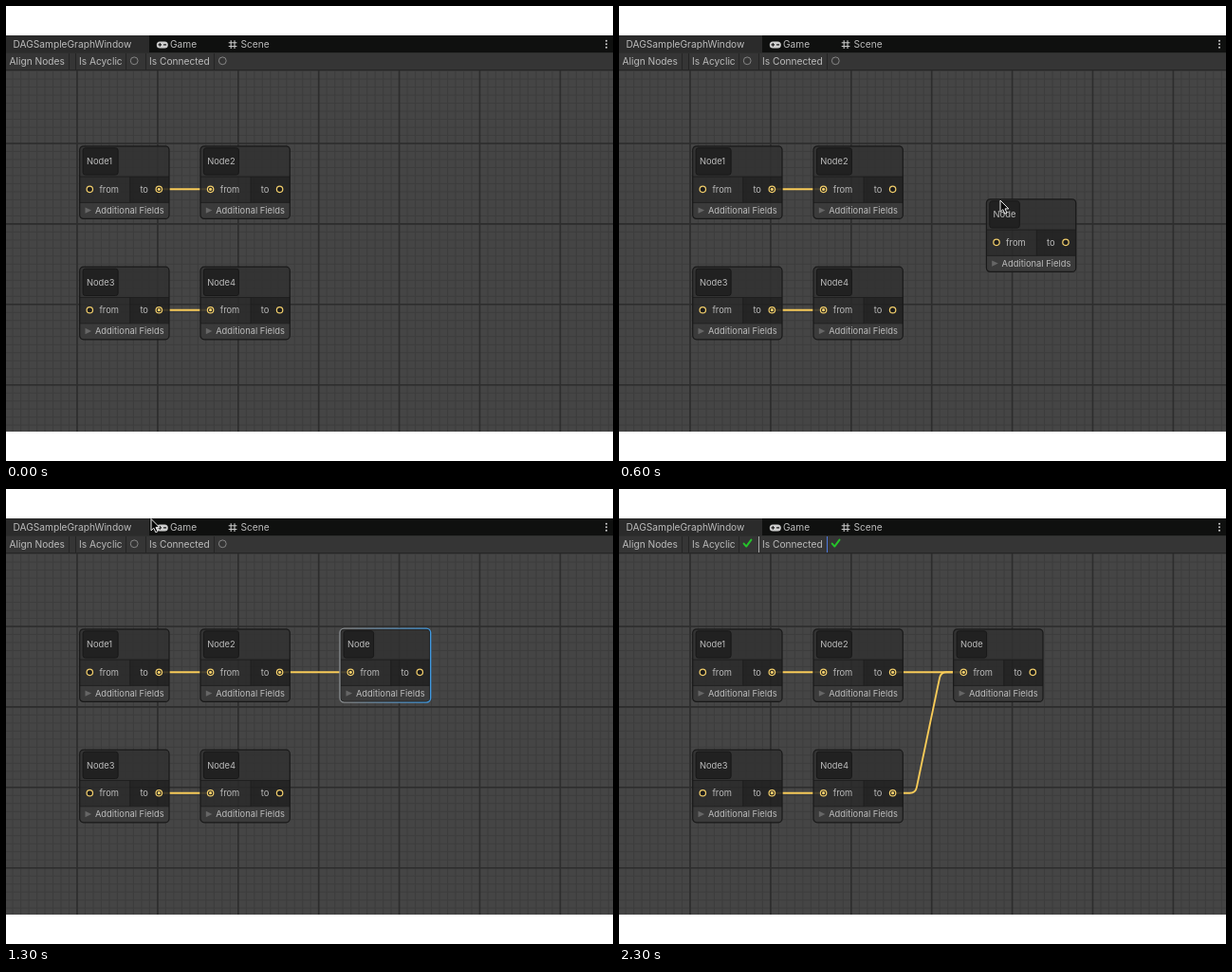
An HTML page that plays this animation: 640 px wide and 480 px high, repeating every 2400 ms.

```html
<!DOCTYPE html>
<html lang="en">
<head>
<meta charset="utf-8">
<title>Graph window</title>
<style>
  html, body { margin: 0; width: 100%; height: 100%; overflow: hidden; background: #fff; }
  svg { display: block; width: 640px; height: 480px; }
  text { font: 9.34px Inter, "Open Sans", sans-serif; fill: #bcbcbc; white-space: pre; }
  .bar text { font-size: 10.19px; }
  .menu text { font-size: 9.1px; font-weight: 500; fill: #747072; }
  .menu .on { fill: #fff; }
  .edge { fill: none; stroke: #f8cb58; stroke-width: 1.9; }
  .port { fill: #1c1c1c; stroke: #f3cf6c; stroke-width: 1.25; }
  .dot { fill: #f3cf6c; }
  .line { fill: none; stroke-linecap: round; stroke-linejoin: round; }
</style>
</head>
<body>
<svg viewBox="0 0 640 480">
  <defs>
    <clipPath id="stage"><rect y="31" width="640" height="418"/></clipPath>
    <linearGradient id="fade">
      <stop offset=".1" stop-color="#85898c"/>
      <stop offset="1" stop-color="#3f97dd"/>
    </linearGradient>
    <linearGradient id="hover">
      <stop offset="0" stop-color="#4596cb"/>
      <stop offset="1" stop-color="#657984"/>
    </linearGradient>
  </defs>
  <g clip-path="url(#stage)">
    <rect y="31" width="640" height="418" fill="#454545"/>
    <path id="thin" stroke="#3d3d3d" stroke-width="1"/>
    <path id="thick" stroke="#2d2d2d" stroke-width="1.6"/>
    <g id="graph"></g>
    <g class="bar">
      <rect y="31" width="640" height="18.5" fill="#0f100f"/>
      <rect y="31" width="151" height="18.5" fill="#2b2b2b"/>
      <rect y="49.5" width="640" height="18" fill="#353535"/>
      <path d="M0 67.6H640" stroke="#242424"/>
      <text x="7.5" y="43.9">DAGSampleGraphWindow</text>
      <text x="173" y="43.9">Game</text>
      <text x="247.5" y="43.9">Scene</text>
      <g fill="#cecece">
        <rect x="158.8" y="37.4" width="12" height="7" rx="3.5"/>
        <circle cx="633" cy="36.7" r="1"/><circle cx="633" cy="40.2" r="1"/><circle cx="633" cy="43.7" r="1"/>
      </g>
      <path d="M160.5 40.9h3.6M162.3 39.1v3.6M166 40.9h3" stroke="#181818" stroke-width="1.1"/>
      <path d="M237.2 36.3v8.6M241 36.3v8.6M234.7 38.7h8.7M234.7 42.5h8.7" stroke="#c8c8c8" stroke-width="1.1"/>
      <text x="3.5" y="62.3">Align Nodes</text>
      <text x="77" y="62.3">Is Acyclic</text>
      <text x="151" y="62.3">Is Connected</text>
      <path d="M66.5 50v17M73.5 50v17M126.5 50v17" stroke="#242424"/>
      <g id="status"></g>
    </g>
    <g id="overlay"></g>
  </g>
</svg>
<script>
const STEP = 100, STEPS = 24, UNIT = 8.49;
const $ = id => document.getElementById(id);

// Background grid
function gridPath(stride) {
  let d = "";
  for (let i = -10; i < 80; i++) {
    if (i % stride) continue;
    d += `M${75 + i * UNIT} 68V449M0 ${145 + i * UNIT}H640`;
  }
  return d;
}
$("thin").setAttribute("d", gridPath(1));
$("thick").setAttribute("d", gridPath(10));

const text = (x, y, s, cls = "") => `<text x="${x}" y="${y}" class="${cls}">${s}</text>`;
const chevron = `<path class="line" d="M84 15.3l3 3 3-3" stroke="#aaa" stroke-width="1.1"/>`;

function port(x, y, full) {
  return `<circle class="port" cx="${x}" cy="${y}" r="3.2"/>` +
    (full ? `<circle class="dot" cx="${x}" cy="${y}" r="1.6"/>` : "");
}

// Nodes are drawn from their top left corner
function node({ x, y, name, field, input, output, ring, ringWidth, arrow }) {
  return `<g transform="translate(${x} ${y})">
    <g fill-opacity=".86">
      <path d="M0 32.3V4a4 4 0 0 1 4-4H90.3a4 4 0 0 1 4 4V32.3z" fill="#313131"/>
      <path d="M0 32.3H53V59.6H0z" fill="#2b2b2b"/>
      <path d="M53 32.3H94.3V59.6H53z" fill="#202020"/>
      <path d="M0 59.6H94.3V72.6a4 4 0 0 1-4 4H4a4 4 0 0 1-4-4z" fill="#3a3a3a"/>
    </g>
    <path d="M0 32.3H94.3M0 59.6H94.3M53 32.3V59.6" stroke="#1e1e1e" stroke-width=".9"/>
    <rect width="94.3" height="76.6" rx="4" fill="none" stroke="#191919" stroke-width="1.2"/>
    ${ring ? `<rect x="-.7" y="-.7" width="95.7" height="78" rx="4.5" fill="none" stroke="${ring}" stroke-width="${ringWidth}"/>` : ""}
    <rect x="3.4" y="2" width="${field}" height="28.3" rx="2.5" fill="#212121" stroke="#181818"/>
    ${text(7.2, 19.7, name)}
    ${text(20.7, 48.9, "from")}${text(63.7, 48.9, "to")}
    ${port(10.6, 45.5, input)}${port(83.6, 45.5, output)}
    <path d="M5.8 64.6l6.6 3.2-6.6 3.2z" fill="#666"/>
    ${text(16.2, 70.9, "Additional Fields")}
    ${arrow ? chevron : ""}
  </g>`;
}

// Horizontal leads, with rounded corners where they meet the slope
function edge([x1, y1], [x2, y2]) {
  if (Math.abs(y1 - y2) < 1) return `<path class="edge" d="M${x1} ${y1}H${x2}"/>`;
  const a = x1 + 24, b = x2 - 24, len = Math.hypot(b - a, y2 - y1), r = 6;
  const dx = (b - a) / len * r, dy = (y2 - y1) / len * r, lead = x2 < x1 + 48 ? 0 : r;
  return `<path class="edge" d="M${x1} ${y1}H${a - lead}Q${a} ${y1} ${a + dx} ${y1 + dy}` +
    `L${b - dx} ${y2 - dy}Q${b} ${y2} ${b + lead} ${y2}H${x2}"/>`;
}

const inPort = n => [n.x + 10.6, n.y + 45.5];
const outPort = n => [n.x + 83.6, n.y + 45.5];

function menu(lit) {
  const rows = [["Cut", 227.3], ["Copy", 244.4], ["Paste", 261.4], ["Delete", 287.6], ["Duplicate", 314]];
  return `<g class="menu">
    <rect x="386.3" y="187" width="75" height="141" rx="5" fill="#1a1819"/>
    <rect x="387.3" y="188" width="73" height="139" rx="4.3" fill="#2b2728" stroke="#514c4d" stroke-width=".8"/>
    ${lit ? `<rect x="391.3" y="192.5" width="65.2" height="17.2" rx="3.5" fill="#1557bd"/>` : ""}
    ${text(395.6, 204.3, "Create Node", "on")}
    ${rows.map(([s, y]) => text(395.6, y + 3.3, s)).join("")}
    <path d="M396 214.3H452M396 274.4H452M396 300.4H452" stroke="#4c4748"/>
  </g>`;
}

const arrowCursor = (x, y) => `<path transform="translate(${x} ${y})" d="M0 0V12.3L2.8 9.7 4.8 14.2 7 13.2 5 8.9H8.8z"
  fill="#080808" stroke="#eee" stroke-width="1" stroke-linejoin="round"/>`;
const beamCursor = (x, y) => {
  const d = "M-3-6.5Q0-6.5 0-4.5Q0-6.5 3-6.5M0-4.5V4.5M-3 6.5Q0 6.5 0 4.5Q0 6.5 3 6.5M-2 1.5H2";
  return `<g class="line" transform="translate(${x} ${y})"><path d="${d}" stroke="#111" stroke-width="2.6"/>
    <path d="${d}" stroke="#eee" stroke-width="1.1"/></g>`;
};

const ring = x => `<circle cx="${x}" cy="57.8" r="3.9" fill="none" stroke="#858585"/>`;
const check = x => `<path class="line" d="M${x - 3.6} 57.6l2.6 3 5.2-7" stroke="#25c32a" stroke-width="2"/>`;
const deny = x => `<g fill="none" stroke="#a3161a" stroke-width="1.6"><circle cx="${x}" cy="57.8" r="3.9"/>
  <path d="M${x - 2.7} 55.1l5.4 5.4"/></g>`;
const divider = (x, color) => `<path d="M${x} 50V67" stroke="${color}"/>`;

// Pointer position by step
const pointer = {
  2: [455, 140], 3: [387, 187], 4: [390, 188], 5: [397, 189], 6: [402, 205], 7: [408.5, 231],
  8: [340, 207], 9: [330, 207], 10: [398, 249], 11: [433.5, 194], 12: [415, 165], 13: [153, 31.5],
  14: [100, 58], 15: [150, 60], 16: [183, 59], 17: [293, 316], 18: [335, 255], 19: [363, 195],
  20: [270, 120], 21: [183, 59], 22: [183, 59]
};

function draw(k) {
  const left = 77.7, top = 147.8, gapX = 127.3, gapY = 127.4;
  const [n1, n2, n3, n4] = [0, 1, 2, 3].map(i => ({
    x: left + i % 2 * gapX, y: top + (i >> 1) * gapY, name: "Node" + (i + 1), field: 37
  }));
  const nodes = [n1, n2, n3, n4], links = [[n1, n2], [n3, n4]];
  const at = pointer[k];
  let loose = "";

  if (k >= 6) {
    const [dx, dy] = k < 11 ? [309.7, 56] : k < 12 ? [293.5, 29.8] : [275, 0];
    const made = { x: left + dx, y: top + dy, name: "Node", field: 31.5 };
    nodes.push(made);
    if (k >= 10) links.push([n2, made]);
    if (k >= 19) links.push([n4, made]);
    if (k === 7) Object.assign(made, { ring: "url(#hover)", ringWidth: 1.2, arrow: true });
    if (k === 11 || k === 12) Object.assign(made, { ring: "#429fe8", ringWidth: 1.7 });
    if (k >= 13 && k < 20) Object.assign(made, { ring: "url(#fade)", ringWidth: 1.4 });
  }
  if (k === 17) Object.assign(n4, { ring: "url(#fade)", ringWidth: .9, arrow: true, output: true });
  if (k === 9 || k === 18) {
    const from = k === 9 ? n2 : n4;
    from.output = true;
    loose = edge(outPort(from), at);
  }
  for (const [a, b] of links) a.output = b.input = true;

  $("graph").innerHTML = links.map(([a, b]) => edge(outPort(a), inPort(b))).join("") +
    loose + nodes.map(node).join("");

  const acyclic = k >= 14, tested = k >= 16, joined = k >= 21;
  $("status").innerHTML =
    divider(147.5, acyclic ? "#a6a6a6" : "#242424") + divider(219.5, tested ? "#4d78dd" : "#242424") +
    (acyclic ? check : ring)(135.2) + (joined ? check : tested ? deny : ring)(228.3);

  $("overlay").innerHTML = (k === 4 || k === 5 ? menu(k === 5) : "") +
    (at ? (k === 7 ? beamCursor : arrowCursor)(...at) : "");
}

let shown = -1;
const start = performance.now();
function tick() {
  const k = Math.floor((performance.now() - start) / STEP) % STEPS;
  if (k !== shown) draw(shown = k);
  requestAnimationFrame(tick);
}
tick();
</script>
</body>
</html>
```
